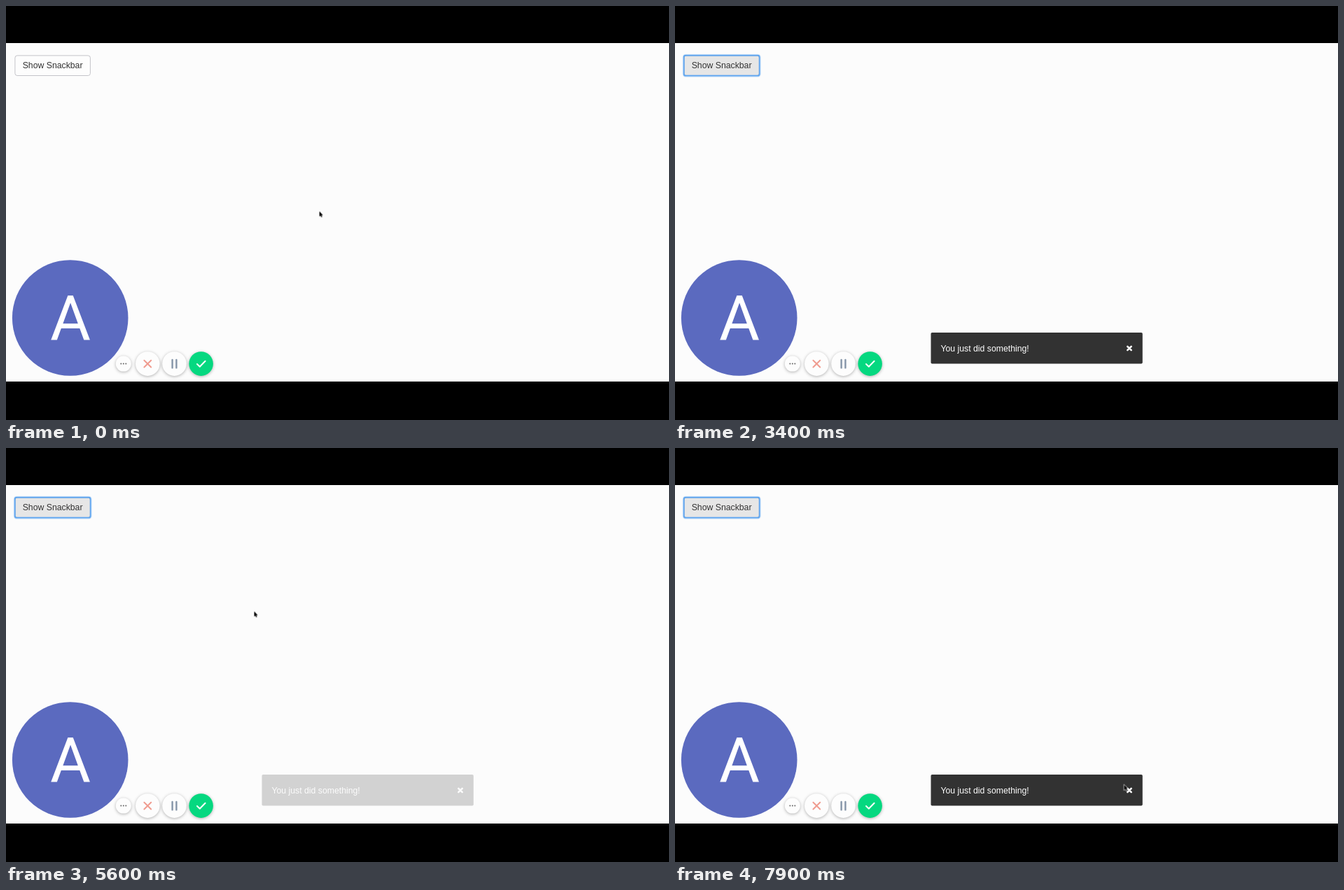
Write an HTML page that moves like this. It is 947x592 px and loops after 8 s.

```html
<!DOCTYPE html>
<html lang="en">
<head>
<meta charset="utf-8">
<title>Snackbar demo</title>
<style>
  html, body { margin: 0; width: 100%; height: 100%; overflow: hidden; background: #000; }
  svg { display: block; }
  .ui { font: 12.25px "Liberation Sans", Arial, sans-serif; }
  .avatar { font: 89px Roboto, sans-serif; fill: #fff; text-anchor: middle; }
  .line { fill: none; stroke-linecap: round; stroke-linejoin: round; }
  .chip { filter: drop-shadow(0 1px 2px rgba(0, 0, 0, .3)); }

  .face, .ring, .snack, .cursor, .blink { animation: 8s infinite; }
  .face { animation-name: hover; animation-timing-function: step-end; }
  .ring { animation-name: focus; animation-timing-function: step-end; }
  .blink { animation-name: blink; animation-timing-function: step-end; }
  .snack { animation-name: fade; animation-timing-function: ease-in-out; }
  .cursor { animation-name: move; animation-timing-function: ease-in-out; }

  @keyframes hover {
    0% { fill: #fdfdfd; stroke: #c4c4c9; }
    8.75%, 100% { fill: #e6e6e6; stroke: #adadb2; }
  }
  @keyframes focus {
    0% { opacity: 0; }
    23.375%, 100% { opacity: 1; }
  }
  @keyframes blink {
    0% { opacity: 1; }
    42.5% { opacity: 0; }
    46.25%, 100% { opacity: 1; }
  }
  @keyframes fade {
    0%, 24.875% { opacity: 0; }
    34.875%, 63.125% { opacity: 1; }
    73.125%, 85.375% { opacity: 0; }
    95.375%, 100% { opacity: 1; }
  }
  @keyframes move {
    0%, .25% { transform: translate(447.6px, 293.6px); }
    10.375%, 10.8% { transform: translate(92px, 88px); }
    19.125%, 46.1% { transform: translate(68.2px, 77.6px); }
    55%, 59.25% { transform: translate(107px, 98.5px); }
    61.25%, 73.75% { transform: translate(354.5px, 233.6px); }
    82.875%, 86.5% { transform: translate(93.5px, 80px); }
    94.125%, 94.8% { transform: translate(629px, 468px); }
    98.75%, 100% { transform: translate(641.6px, 481.6px); }
  }
</style>
</head>
<body>
<svg width="947" height="592" viewBox="0 0 947 592">
  <rect width="947" height="592"/>
  <rect y="53" width="947" height="484" fill="#fcfcfc"/>

  <!-- button -->
  <rect class="face" x="12.9" y="70.9" width="107.5" height="28.6" rx="3.2"/>
  <g class="ring" fill="none" stroke="#5ea5f0">
    <rect x="12.2" y="70.2" width="109" height="30" rx="3" stroke-width="3" opacity=".3"/>
    <rect x="12.7" y="70.7" width="108" height="29" rx="2.5" stroke-width="1.7"/>
  </g>
  <text class="ui" x="23.7" y="89.3" fill="#333">Show Snackbar</text>

  <!-- avatar -->
  <circle cx="91.7" cy="446" r="82.8" fill="#5b6abf"/>
  <text class="avatar" x="92" y="478.3">A</text>

  <!-- recorder controls -->
  <g class="chip" fill="#fdfdfd">
    <circle cx="167.8" cy="511.6" r="11"/>
    <circle cx="202.3" cy="511.6" r="17.3"/>
    <circle cx="240.5" cy="511.6" r="17.3"/>
    <circle cx="278.6" cy="511.6" r="17.3" fill="#05d880"/>
  </g>
  <path class="line" d="M164.3 511.6h.01M167.8 511.6h.01M171.3 511.6h.01" stroke="#666" stroke-width="2"/>
  <path class="line" d="M197.4 506.7l9.8 9.8m0-9.8l-9.8 9.8" stroke="#f09c90" stroke-width="2"/>
  <path class="line" d="M237.6 506v11.4M243.4 506v11.4" stroke="#8595a8" stroke-width="2.4"/>
  <path class="line" d="M273 512l3.8 3.7 7.8-8" stroke="#fff" stroke-width="2"/>

  <!-- snackbar -->
  <g class="snack">
    <rect x="365.5" y="466.9" width="302.3" height="44.7" rx="1.8" fill="#323232"/>
    <text class="ui" x="379.5" y="493.5" fill="#fff">You just did something!</text>
    <path class="line" d="M646.3 486.8l5.4 5.4m0-5.4l-5.4 5.4" stroke="#fff" stroke-width="2.5"/>
  </g>

  <g class="blink">
    <path class="cursor" d="M0 0V7.4L1.7 5.9 2.8 8.6 4.1 8 3 5.4H5.2Z"
          stroke="#fff" stroke-width="1.1" paint-order="stroke"/>
  </g>
</svg>
</body>
</html>
```
